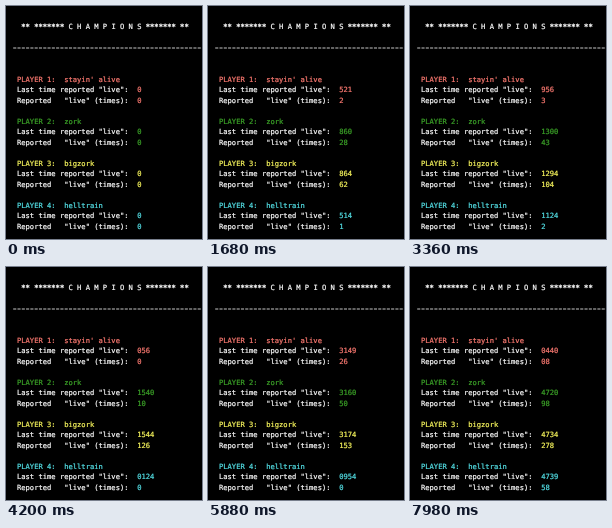
Recreate the animation shown at these times as an HTML page. Size 196 by 233 pixels, loop 8 s.

```html
<!DOCTYPE html>
<html>
<head>
<meta charset="utf-8">
<style>
  html, body { margin: 0; width: 100%; height: 100%; overflow: hidden; background: #000; }
  svg { display: block; }
  text {
    font: 7.13px "DejaVu Sans Mono", monospace;
    color: #f8f8f8;
    fill: currentColor;
    stroke: currentColor;
    stroke-width: .24px;
    white-space: pre;
    text-rendering: geometricPrecision;
  }
  .b { font-weight: bold; }
</style>
</head>
<body>
<svg width="196" height="233" viewBox="0 0 196 233">
  <path d="M7.2 42H196" stroke="#ddd" stroke-width=".9" stroke-dasharray="3.1 1.19"/>
</svg>
<script>
const LOOP = 8000, TICK = 420;
const CHAR = 4.293, LINE = 10.5, LEFT = 11;
const svg = document.querySelector('svg');

// Game cycle reached at a screen refresh; linear in between.
const pace = [[0, 0], [2, 289], [5, 1159], [8, 1303], [12, 1789], [16, 4558], [19, 4739]];

// Tallies restart after 1536 cycles, then after 50 fewer each time.
const resets = [0];
for (let span = 1536; resets.length < 4; span -= 50) resets.push(resets.at(-1) + span);

// Runs of "live" calls: first cycle, average gap, last cycle, spacing of the reported cycle.
const run = (from, gap, to = Infinity, grid = gap) => ({ from, gap, to, grid });
const players = [
  { name: "stayin' alive", color: '#f7776f', runs: [run(85, 435.5, 956), run(1777, 80.69, 4440)] },
  { name: 'zork', color: '#3a9f27', runs: [run(40, 30, 1539, 10), run(1540, 30, Infinity, 20)] },
  { name: 'bigzork', color: '#f6f45c', runs: [run(224, 10.415, Infinity, 10)] },
  { name: 'helltrain', color: '#52dce2', runs: [run(514, 610, 4458), run(4464, 4.8, Infinity, 5)] }
];

function put(str, col, y, color = '', cls = '') {
  const t = document.createElementNS('http://www.w3.org/2000/svg', 'text');
  t.setAttribute('x', LEFT + col * CHAR);
  t.setAttribute('y', y);
  t.setAttribute('class', cls);
  t.style.color = color;
  t.textContent = str;
  svg.append(t);
  return t;
}

put('** *******', 1, 23.2, '', 'b');
put('C H A M P I O N S', 12, 22.8);
put('******* **', 30, 23.2, '', 'b');

players.forEach((p, i) => {
  const y = 75.5 + i * 4 * LINE;
  put(`PLAYER ${i + 1}:  ${p.name}`, 0, y, p.color);
  put('Last time reported "live":', 0, y + LINE);
  put('Reported   "live" (times):', 0, y + 2 * LINE);
  p.lastText = put('', 28, y + LINE, p.color);
  p.timesText = put('', 28, y + 2 * LINE, p.color);
});

function cycleAt(tick) {
  const k = pace.findIndex(([t]) => t >= tick);
  if (k < 1) return 0;
  const [t0, c0] = pace[k - 1], [t1, c1] = pace[k];
  return Math.round(c0 + (c1 - c0) * (tick - t0) / (t1 - t0));
}

function tally({ runs }, cycle) {
  let last = 0, times = 0;
  for (const { from, gap, to, grid } of runs) {
    if (cycle < from) break;
    const run = Math.min(cycle, to) - from;
    times += Math.floor(run / gap) + 1;
    last = Math.round(from + Math.floor(run / grid) * grid);
  }
  return { last, times };
}

// A shorter number leaves the tail of the older one on the screen.
const over = (value, old) => value + old.slice(String(value).length);

function show(p, cycle) {
  let last = '', times = '';
  resets.forEach((start, i) => {
    if (start > cycle) return;
    const end = Math.min(cycle, resets[i + 1] ?? cycle);
    const now = tally(p, end), count = now.times - tally(p, start).times;
    last = over(count ? now.last : 0, last);
    times = over(count, times);
  });
  p.lastText.textContent = last;
  p.timesText.textContent = times;
}

function draw(now) {
  const cycle = cycleAt(Math.floor((now % LOOP) / TICK));
  for (const p of players) show(p, cycle);
  requestAnimationFrame(draw);
}
draw(0);
</script>
</body>
</html>
```
